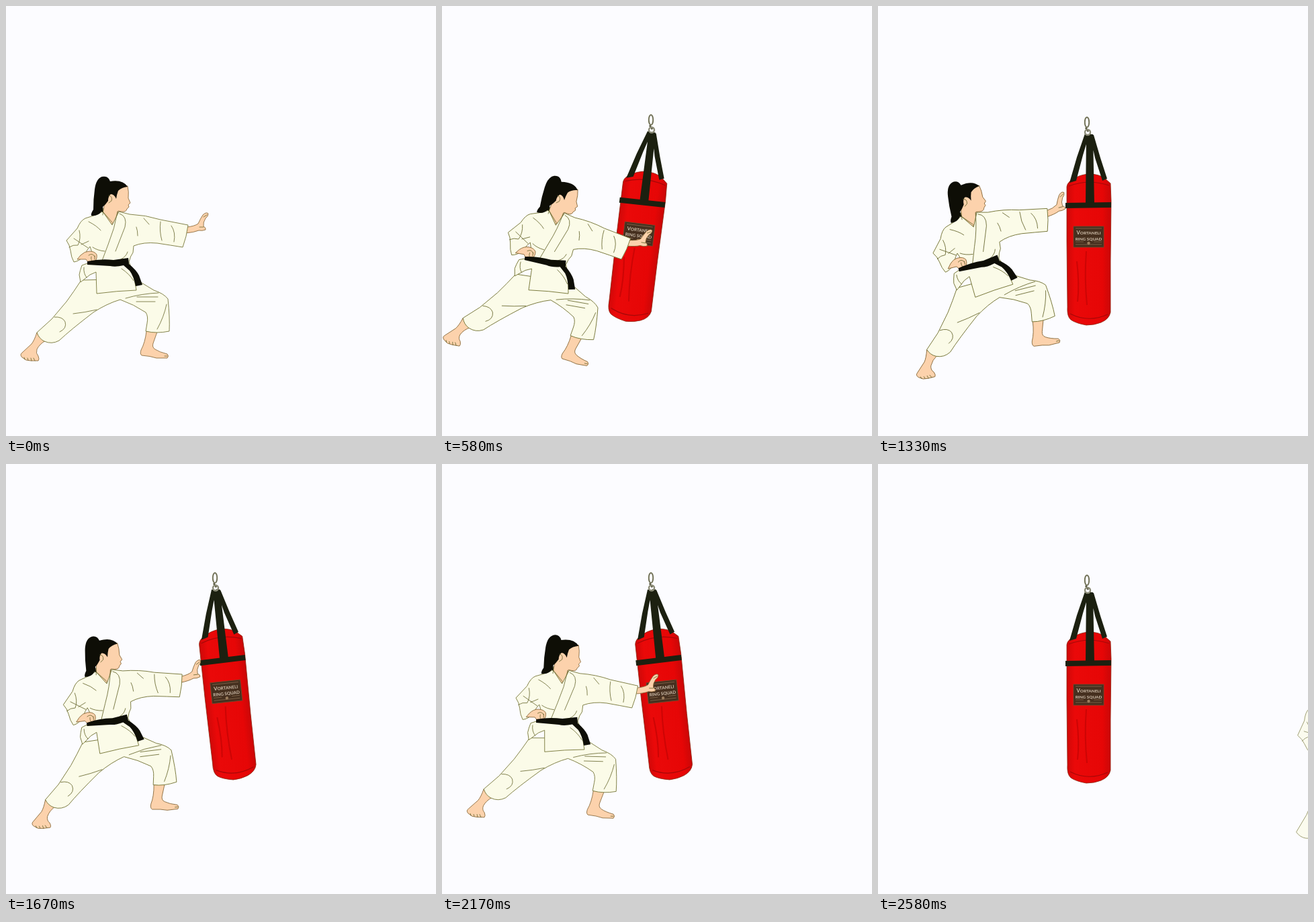
An HTML page for the animation above (2660 ms loop, 640 by 640 pixels).

```html
<!DOCTYPE html>
<html lang="en">
<head>
<meta charset="utf-8">
<title>Karate training</title>
<style>
html, body { margin: 0; width: 100%; height: 100%; overflow: hidden; background: #fcfcff; }
svg { display: block; width: 100vw; height: 100vh; }
.line { fill: none; stroke: #66662e; stroke-width: .8; stroke-linecap: round; stroke-linejoin: round; }
.gi { fill: #fbfbe8; stroke: #77773a; stroke-width: .9; stroke-linejoin: round; }
.skin { fill: #fcd2ac; stroke: #80602f; stroke-width: .8; stroke-linejoin: round; }
.dark { fill: #0e0e06; }
.strap { fill: #1c2010; }
</style>
</head>
<body>
<svg viewBox="0 0 640 640">
  <defs>
    <linearGradient id="red">
      <stop offset="0" stop-color="#cf0808"/>
      <stop offset=".18" stop-color="#ea0909"/>
      <stop offset=".8" stop-color="#e60606"/>
      <stop offset="1" stop-color="#c90707"/>
    </linearGradient>
    <clipPath id="wipe"><rect id="edge" y="0" width="1000" height="640"/></clipPath>
  </defs>

  <g id="bagClip">
    <g id="bag">
      <g id="body">
        <path fill="url(#red)" stroke="#8d2410" stroke-width=".8" d="M281 269Q282 262 290 258Q300 251 314 250Q328 250 337 256L346 264L347 290L346 380L346 456Q344 466 332 471Q322 475 310 475Q294 472 287 467Q281 462 282 448L281 350Z"/>
        <path fill="none" stroke="#a50808" stroke-width="1.2" d="M284 268Q313 257 344 267M286 458Q313 472 342 459"/>
        <path fill="none" stroke="#cc0505" stroke-width="2" d="M310 365Q307 405 311 445M296 380Q300 415 297 440"/>
        <path class="strap" d="M308 190L314 192L305 222L295 260L285 263L296 225ZM315 190L321 192L331 226L341 257L334 260L323 226ZM310 191H320L322 296H309Z"/>
        <path class="strap" d="M279 293L347 292V300L279 301Z"/>
        <rect x="291" y="328" width="45" height="31" fill="#46301f" stroke="#6d4d30" stroke-width=".8"/>
        <path fill="none" stroke="#8d7154" stroke-width=".7" d="M294 331H333M294 351H306M321 351H333M294 355H333"/>
        <circle cx="313.5" cy="353" r="2.2" fill="#9a7c5c"/>
        <g fill="#d3c3b0" text-anchor="middle" font-family="Lato, sans-serif" font-weight="700">
          <text x="313.5" y="340" font-size="6.4"><tspan font-size="7.6">V</tspan>ORTANELI</text>
          <text x="313.5" y="348.6" font-size="6.4">RING SQUAD</text>
        </g>
      </g>
      <ellipse cx="311" cy="173" rx="3.2" ry="7.6" fill="none" stroke="#74745a" stroke-width="2"/>
      <path d="M309 181L313 187" stroke="#55553d" stroke-width="2.4"/>
      <circle cx="312" cy="188" r="4" fill="none" stroke="#8c8c78" stroke-width="2.4"/>
    </g>
  </g>

  <g id="woman">
    <g id="feet">
      <path class="skin" d="M46 486Q42 498 38 503L24 516Q20 519 24 523L30 527L37 528H48Q50 526 48 521Q44 517 46 511Q50 503 59 498Z"/>
      <path class="line" d="M28 526L27 523M33 527L32 524M38 528L37 524M43 528L41 524"/>
      <path class="skin" d="M209 484Q207 501 201 512Q199 518 202 520Q215 521 224 524H240Q243 521 240 518Q228 515 222 511Q217 508 219 502L225 485Z"/>
      <path class="line" d="M236 521L240 521"/>
    </g>

    <path class="gi" d="M112 408Q101 425 90 440L68 466L46 486Q49 495 57 499Q68 504 79 498Q96 482 130 456Q150 443 170 437Q190 444 208 456Q212 462 210 472L208 484Q224 488 243 484Q244 464 241 436Q235 428 220 423L192 406Z"/>
    <path class="line" d="M100 458Q118 456 135 452M72 463Q84 462 88 470Q91 480 80 485M178 435Q202 428 227 427M195 433H226M194 440H222M239 444Q235 463 225 481"/>

    <path class="skin" d="M269 329Q280 328 286 324Q289 317 293 311Q298 306 301 309Q301 313 297 316Q293 322 294 328Q298 330 297 333Q292 335 287 334Q280 337 267 338Z"/>
    <path class="line" d="M294 314L299 311M288 329L294 329"/>

    <path class="skin" d="M181 268Q183 276 182 286L185 293L182 296L183 299L180 302Q179 307 172 306L167 305L163 320L155 326L144 307L150 280L164 266Z"/>
    <path class="gi" d="M144 306Q130 313 118 316Q111 319 106 331L90 349Q95 356 96 364Q97 374 101 381Q109 380 116 372L121 363L125 358L132 379L113 386Q110 394 109 400L111 411L125 400L134 396L135 428Q165 424 194 423L189 395L183 381Q185 372 189 367L190 357Q205 351 225 353Q245 356 263 359Q269 343 271 326L230 318Q208 311 184 310L168 306L158 326Z"/>
    <path class="line" d="M144 306L158 322M166 306Q162 331 152 355L143 379M169 309Q181 313 177 329L163 365M123 321Q135 327 141 334M109 334Q112 346 107 356Q100 355 94 359M101 346L122 360M129 359Q136 364 147 365M112 355L123 350M194 329Q196 334 196 342M230 321Q228 335 232 349M246 327Q253 337 250 351M205 316L213 325M181 366Q179 373 171 377M116 389Q115 398 120 404M172 391Q184 399 190 409"/>
    <path class="skin" d="M111 371Q117 365 124 365Q132 365 135 370Q136 377 132 380L122 381L119 377L106 377Z"/>
    <path class="line" d="M123 371Q129 367 132 373M127 373Q126 378 128 379M132 372V377"/>

    <path class="dark" d="M121 380Q140 376 160 378L182 375L183 384Q194 393 198 401L203 415L193 417Q190 402 184 394L175 386Q163 389 155 387L121 385Z"/>
    <path class="dark" d="M181 269Q172 270 167 275Q165 280 164 287Q161 280 156 280Q152 283 152 290Q148 296 144 299L145 307L142 306Q137 313 127 312Q126 309 130 303Q130 287 132 273Q134 257 143 254Q152 252 155 261Q174 258 181 269Z"/>
    <path class="line" d="M153 282Q159 283 157 290L153 293M145 301L144 311"/>
  </g>
</svg>
<script>
const LOOP = 2660, STEP = 1000 / 12;
const $ = id => document.getElementById(id);
const bag = $("bag"), body = $("body"), edge = $("edge"), bagClip = $("bagClip"), woman = $("woman"), feet = $("feet");
const clamp = v => Math.max(0, Math.min(1, v));

// Smooth curve through [time, value] pairs
function track(keys) {
  const slope = i => {
    const a = keys[Math.max(0, i - 1)], b = keys[Math.min(keys.length - 1, i + 1)];
    return (b[1] - a[1]) / (b[0] - a[0]);
  };
  return t => {
    if (t <= keys[0][0]) return keys[0][1];
    const i = keys.findIndex(k => k[0] >= t);
    if (i < 0) return keys[keys.length - 1][1];
    const [t0, v0] = keys[i - 1], [t1, v1] = keys[i];
    const d = t1 - t0, u = (t - t0) / d, w = 1 - u;
    return w * w * ((1 + 2 * u) * v0 + u * d * slope(i - 1)) + u * u * ((3 - 2 * u) * v1 - w * d * slope(i));
  };
}

const lean = track([[0, 0], [333, 8.1], [560, 10], [750, 8.6], [917, 4.9], [1167, -6.5], [1333, -14.1],
  [1420, -14.7], [1667, -7.1], [1750, -4.9], [2040, 3.6], [2167, 1.6], [2333, -4], [2583, -17]]);
const swing = track([[250, 17], [333, 13], [500, 7.6], [667, 7], [917, 6.3], [1333, 0],
  [1667, -6.1], [1920, -6.8], [2167, -6.2], [2583, 0]]);
const hookX = track([[250, 70], [333, 124], [417, 230], [500, 296], [583, 311]]);
const hookY = track([[250, 233], [333, 217], [417, 185], [500, 169], [583, 165]]);
const size = track([[250, .5], [333, .62], [417, .84], [500, .97], [583, 1]]);

function drawBag(t) {
  const a = swing(t), lift = Math.min(1, Math.abs(a) / 6), x = hookX(t);
  bagClip.style.display = t < 240 ? "none" : "";
  bag.setAttribute("opacity", clamp(.7 + (t - 333) / 400));
  bag.setAttribute("transform", `translate(${x} ${hookY(t) - 3.5 * lift * size(t)}) scale(${size(t)}) translate(-311 -165)`);
  body.setAttribute("transform", `translate(${-2 * lift} 0) rotate(${a} 311 190)`);
  edge.setAttribute("x", x - 19 - (t - 333) * .7);
  if (t < 580) bagClip.setAttribute("clip-path", "url(#wipe)");
  else bagClip.removeAttribute("clip-path");
}

function drawWoman(t) {
  const x = 19.7 * Math.pow(Math.max(0, t - 1920) / 250, 3.4);
  woman.setAttribute("transform", `translate(${x} ${x * .059}) rotate(${lean(t)} 162 391)`);
  woman.setAttribute("opacity", 1 - .3 * clamp((t - 2420) / 160));
  feet.setAttribute("opacity", 1 - clamp((t - 2450) / 130));
}

function draw(ms) {
  const t = Math.floor((ms % LOOP + 4) / STEP) * STEP;
  drawBag(Math.min(t, 2584));
  drawWoman(Math.min(t, 2584));
}

const start = performance.now();
function tick() {
  draw(performance.now() - start);
  requestAnimationFrame(tick);
}
draw(0);
requestAnimationFrame(tick);
</script>
</body>
</html>
```
